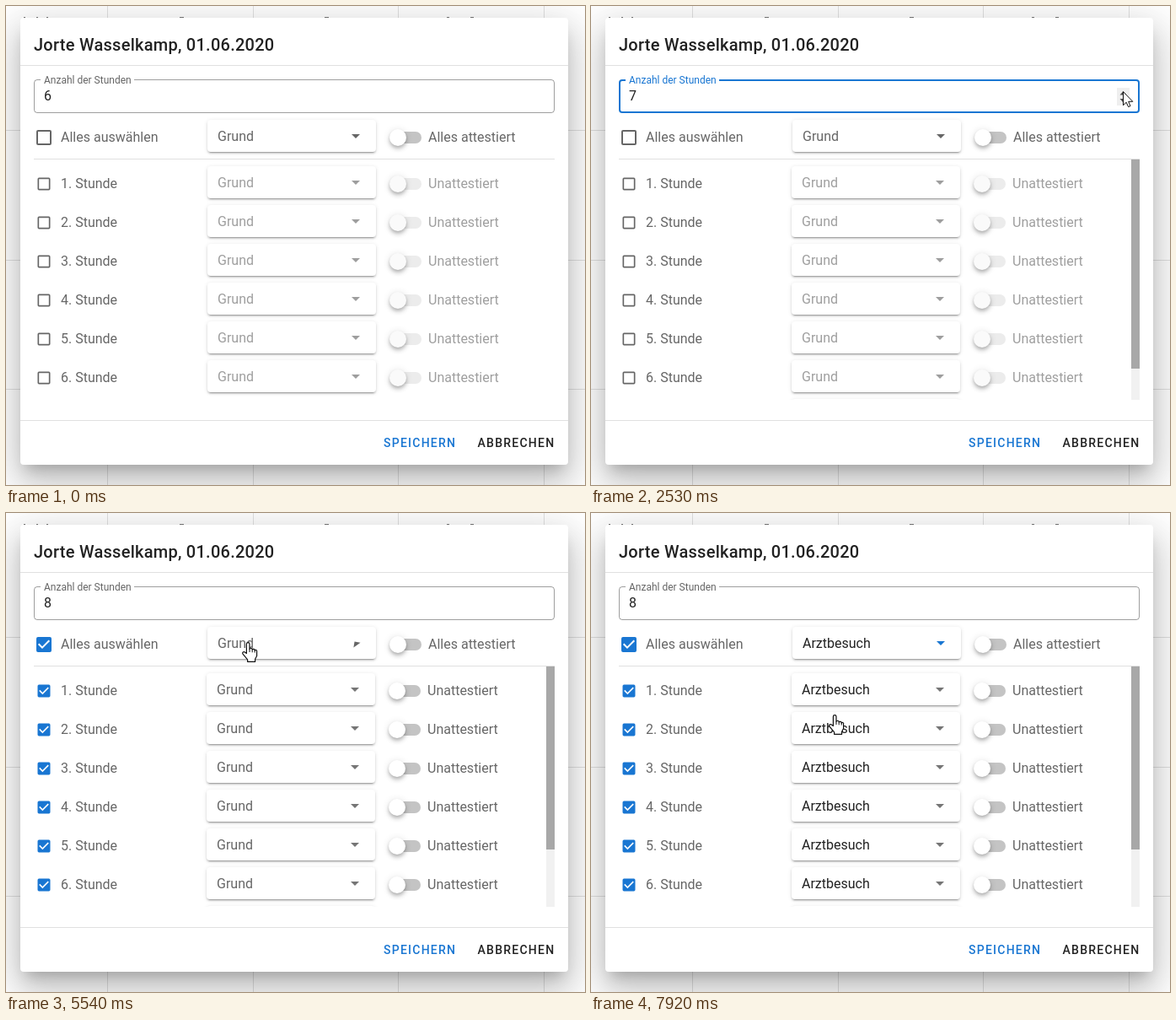
Recreate the animation shown at these times as an HTML page. Size 687 px wide and 568 px high, loop 8000 ms.

```html
<!DOCTYPE html>
<html lang="de">
<head>
<meta charset="utf-8">
<title>Abwesenheit</title>
<style>
html, body { margin: 0; width: 100%; height: 100%; overflow: hidden; background: #fff; }
#stage { position: relative; width: 687px; height: 568px; overflow: hidden; font-family: Roboto, sans-serif; }
#stage div, #stage svg { position: absolute; box-sizing: border-box; }
.text { white-space: pre; line-height: normal; }
.line { background: #e0e0e0; }
.dialog { background: #fff; border-radius: 4px;
  box-shadow: 0 11px 15px -7px rgba(0,0,0,.2), 0 24px 38px 3px rgba(0,0,0,.14), 0 9px 46px 8px rgba(0,0,0,.12); }
.select { background: #fff; border-radius: 4px;
  box-shadow: 0 3px 1px -2px rgba(0,0,0,.2), 0 2px 2px rgba(0,0,0,.14), 0 1px 5px rgba(0,0,0,.12); }
.menu { background: #fff; border-radius: 4px;
  box-shadow: 0 5px 5px -3px rgba(0,0,0,.2), 0 8px 10px 1px rgba(0,0,0,.14), 0 3px 14px 2px rgba(0,0,0,.12); }
.track { border-radius: 7px; }
.thumb { border-radius: 50%;
  box-shadow: 0 2px 4px -1px rgba(0,0,0,.2), 0 4px 5px rgba(0,0,0,.14), 0 1px 10px rgba(0,0,0,.12); }
.field { border-radius: 4px; }
.ripple { border-radius: 50%; background: #1976d2; }
svg { overflow: visible; }
</style>
</head>
<body>
<div id="stage"></div>
<script>
const LOOP = 8000;
const BLUE = "#1976d2";
const FOCUS = 1350, SEVEN = 2460, EIGHT = 2920, CHECK = 4340;
const OPEN = 5420, PICK = 7420, CLOSE = 7560;
const ink = a => `rgba(0,0,0,${a})`;
const clamp = v => Math.max(0, Math.min(1, v));
const part = (t, from, len) => clamp((t - from) / len);
const swift = p => 1 - Math.pow(1 - p, 3.15);
const smooth = p => p * p * (3 - 2 * p);
const mix = (a, b, p) => `rgb(${a.map((v, i) => Math.round(v + (b[i] - v) * p))})`;
const show = (el, on) => { el.style.display = on ? "" : "none"; };

const stage = document.getElementById("stage");

function box(parent, x, y, w, h, cls, fill) {
  const el = document.createElement("div");
  if (cls) el.className = cls;
  Object.assign(el.style, { left: x + "px", top: y + "px", width: w + "px", height: h + "px" });
  if (fill) el.style.background = fill;
  parent.append(el);
  return el;
}

// y is the baseline
function text(parent, str, x, y, size, color, weight = 400, spacing = 0) {
  const el = document.createElement("div");
  el.className = "text";
  el.textContent = str;
  Object.assign(el.style, {
    left: x + "px", top: y - Math.round(size * .9277) + "px", fontSize: size + "px",
    color, fontWeight: weight, letterSpacing: spacing + "px"
  });
  parent.append(el);
  return el;
}

function icon(parent, x, y, w, h, view, body) {
  const holder = document.createElement("div");
  holder.innerHTML = `<svg width="${w}" height="${h}" viewBox="0 0 ${view}">${body}</svg>`;
  const el = holder.firstChild;
  el.style.left = x + "px";
  el.style.top = y + "px";
  parent.append(el);
  return el;
}

function checkbox(parent, cx, cy, size) {
  const el = icon(parent, cx - size / 2, cy - size / 2, size, size, "24 24",
    `<rect x="4" y="4" width="16" height="16" rx="1" stroke-width="2"/>
     <path d="M5.7 11.3L10 15.6L18.3 7.3" fill="none" stroke="#fff" stroke-width="2"/>`);
  const [rect, tick] = el.children;
  return (on, color) => {
    rect.setAttribute("stroke", on ? color : ink(.6));
    rect.setAttribute("fill", on ? color : "none");
    show(tick, on);
  };
}

function select(parent, x, y) {
  const el = box(parent, x, y, 200, 38, "select");
  const label = text(el, "Grund", 12, 25, 16, ink(.6));
  const arrow = icon(el, 171, 17, 10, 5, "10 5", '<path d="M0 0H10L5 5Z"/>');
  return (value, color, arrowColor, turn = 0) => {
    label.textContent = value;
    label.style.color = color;
    arrow.style.fill = arrowColor;
    arrow.style.transform = `rotate(${turn}deg)`;
  };
}

function toggle(parent, x, cy, caption) {
  const track = box(parent, x + 2, cy - 7, 36, 14, "track");
  const knob = box(parent, x, cy - 10, 20, 20, "thumb");
  const label = text(parent, caption, x + 46, cy + 5, 16, ink(.6));
  return on => {
    track.style.background = on ? "#c4c4c4" : "#ececec";
    knob.style.background = on ? "#fff" : "#fafafa";
    label.style.color = ink(on ? .6 : .38);
  };
}

// Page behind the dialog
for (const x of [120, 293, 465, 638]) box(stage, x, 0, 1, 568, "line");
for (const y of [147, 301, 454]) box(stage, 0, y, 687, 1, "line");
for (const [x, w] of [[21, 2], [36, 2], [48, 2], [206, 5], [378, 5], [523, 3], [551, 4]])
  box(stage, x, 13, w, 1, "", "#777");

// Dialog frame
box(stage, 17, 14, 650, 530, "dialog");
text(stage, "Jorte Wasselkamp, 01.06.2020", 33, 53, 20, ink(.87), 500, .25);
box(stage, 17, 70, 650, 1, "line");
box(stage, 17, 491, 650, 1, "line");
text(stage, "SPEICHERN", 448, 523, 14, BLUE, 500, 1.25);
text(stage, "ABBRECHEN", 559.5, 523, 14, ink(.87), 500, 1.25);

// Number field
const field = box(stage, 33, 87, 618, 40, "field");
box(stage, 41, 86, 111, 4, "", "#fff");
const fieldLabel = text(stage, "Anzahl der Stunden", 45, 92, 12, ink(.6));
const count = text(stage, "6", 45, 112, 16, ink(.87));
const caret = box(stage, 54, 97, 1, 19, "", "#222");
const spinner = icon(stage, 624, 97, 15, 21, "15 21",
  `<path d="M0 0H15V21H0Z" fill="#efefef"/>
   <path d="M3.5 8.5L7.5 4L11.5 8.5ZM3.5 13L7.5 17.5L11.5 13Z" fill="#505050"/>`);

// Header row
const allCheck = checkbox(stage, 45, 156, 24);
text(stage, "Alles auswählen", 65, 161, 16, ink(.6));
const allSelect = select(stage, 239, 135);
toggle(stage, 455, 156, "Alles attestiert")(true);
const ripple = box(stage, 25, 136, 40, 40, "ripple");
box(stage, 33, 181, 618, 1, "line");

// Lesson list
const list = box(stage, 17, 182, 634, 285);
list.style.overflow = "hidden";
const rows = Array.from({ length: 8 }, (_, i) => {
  const el = box(list, 0, i * 46, 634, 46);
  const right = box(el, 0, 0, 634, 46);
  const check = checkbox(el, 28, 28.5, 20);
  text(el, `${i + 1}. Stunde`, 48, 34, 16, ink(.6));
  return { el, right, check, pick: select(right, 222, 8), flip: toggle(right, 438, 29, "Unattestiert") };
});
const bar = box(list, 624, 0, 10, 285, "", "#f1f1f1");
const barThumb = box(bar, 0, 0, 10, 217, "", "#a8a8a8");

// Menu
const menu = box(stage, 239, 135, 200, 296, "menu");
const items = ["Unbekannt", "Krankheit", "Arztbesuch", "Konferenz", "Privat", "familiäre Gründe", "sonstiges"]
  .map((name, i) => {
    const el = box(menu, 0, 8 + i * 40, 200, 40);
    text(el, name, 16, 24, 13, ink(.87), 500);
    return el;
  });

// Pointer shapes with their hot spots
const shapes = {
  arrow: [0, 0, '<path d="M.5 .7V16.7L4.2 13.2L6.6 18.6L9 17.6L6.7 12.3H11.8Z" fill="#fff" stroke="#111"/>'],
  hand: [7, 0, `<path d="M5.4 13.5V2.4a1.8 1.8 0 0 1 3.6 0V8.6a1.6 1.6 0 0 1 3.2 .6a1.6 1.6 0 0 1 3 .9
    a1.3 1.3 0 0 1 2.4 .9V16.5L15.6 20.3V23.3H6.6V20.8L1 14.2a1.6 1.6 0 0 1 2.4 -2.1Z"
    fill="#fff" stroke="#111" stroke-width="1.2" stroke-linejoin="round"/>
    <path d="M9 8.6V12M12.2 9.2V12.3M15.2 10.1V12.6" stroke="#111" fill="none"/>`],
  beam: [3.5, 8, '<path d="M0 .5H3M4 .5H7M3.5 1V16M0 16.5H3M4 16.5H7" stroke="#111" stroke-width="1.2" fill="none"/>']
};
const pointers = {};
for (const kind in shapes) pointers[kind] = icon(stage, 0, 0, 18, 24, "18 24", shapes[kind][2]);

// Moves as [time, x, y]; the pointer rests between them
const moves = [
  [[420, 400, 529], [640, 455, 420], [900, 540, 190], [1160, 562, 109]],
  [[1720, 562, 109], [1850, 602.5, 109], [2020, 625, 106], [2220, 631, 101]],
  [[3400, 631, 101], [3540, 524, 135], [3700, 300, 192], [3850, 85, 208], [3960, 6, 184], [4140, 40, 151]],
  [[4800, 40, 151], [5100, 170, 157], [5400, 287, 153]],
  [[6050, 287, 153], [6400, 288, 172], [6790, 289, 200]],
  [[6890, 289, 200], [7030, 289, 222], [7170, 289, 239]]
];

function spline(a, b, c, d, p) {
  return b + .5 * p * (c - a + p * (2 * a - 5 * b + 4 * c - d + p * (3 * (b - c) + d - a)));
}

function pointerAt(t) {
  const move = moves.filter(m => m[0][0] <= t).pop();
  if (!move) return null;
  const last = move.length - 1;
  if (t >= move[last][0]) return move[last].slice(1);
  const i = move.findIndex(k => k[0] > t) - 1;
  const at = j => move[Math.max(0, Math.min(last, j))];
  const p = (t - at(i)[0]) / (at(i + 1)[0] - at(i)[0]);
  return [1, 2].map(n => spline(at(i - 1)[n], at(i)[n], at(i + 1)[n], at(i + 2)[n], p));
}

function inField([x, y]) {
  return y > 87 && y < 127 && x > 33 && x < 651;
}

function pointerKind([x, y], t) {
  if (t > OPEN) return "hand";
  if (inField([x, y]) && x < 624) return "beam";
  const dy = Math.abs(y - 155);
  const overSelect = dy < 19 && x > 239 && x < 439;
  const overLabel = dy < 12 && (x > 25 && x < 181 || x > 453 && x < 605);
  return overSelect || overLabel ? "hand" : "arrow";
}

function drawField(t, pos, n) {
  const focused = t >= FOCUS && t < CHECK;
  const hover = pos && inField(pos);
  field.style.border = focused ? `2px solid ${BLUE}` : `1px solid ${ink(hover ? .86 : .38)}`;
  const tint = part(t, FOCUS, 180) - part(t, CHECK, 200);
  fieldLabel.style.color = mix([102, 102, 102], [25, 118, 210], tint);
  count.textContent = n;
  show(caret, t >= 1400 && t < 1900);
  show(spinner, focused || hover);
}

function drawRows(t, n) {
  const on = t >= CHECK, picked = t >= CLOSE;
  const scroll = n > 6;
  const checkColor = mix([117, 117, 117], [25, 118, 210], swift(part(t, 4400, 450)));
  const value = picked ? "Arztbesuch" : "Grund";
  const valueColor = ink(picked ? .87 : on ? .6 : .38);

  allCheck(on, checkColor);
  const turn = 180 * (swift(part(t, OPEN, 300)) - swift(part(t, CLOSE, 300)));
  allSelect(value, ink(picked ? .87 : .6), t > 5620 ? BLUE : ink(.6), turn);

  rows.forEach((row, i) => {
    show(row.el, i < n);
    row.right.style.left = scroll ? "-1px" : "0";
    row.check(on, checkColor);
    row.pick(value, valueColor, ink(on ? .54 : .38));
    row.flip(on);
  });
  show(bar, scroll);
  barThumb.style.height = Math.round(285 * 285 / (46 * n + 6)) + "px";

  const grow = swift(part(t, CHECK, 220));
  ripple.style.transform = `scale(${grow})`;
  ripple.style.opacity = .4 * (on ? 1 - part(t, 4780, 220) : 0);
}

function drawMenu(t, pos) {
  const alpha = smooth(part(t, 5620, 120)) - smooth(part(t, CLOSE, 220));
  show(menu, alpha > 0);
  menu.style.opacity = alpha;
  const hot = pos ? Math.floor((pos[1] - 143) / 40) : -1;
  const shade = .04 + .08 * part(t, PICK, 140);
  items.forEach((el, i) => { el.style.background = i === hot ? ink(shade) : "none"; });
}

function drawPointer(t, pos) {
  const kind = pos && pointerKind(pos, t);
  for (const k in pointers) show(pointers[k], k === kind);
  if (!kind) return;
  const [dx, dy] = shapes[kind];
  pointers[kind].style.transform = `translate(${Math.round(pos[0] - dx)}px,${Math.round(pos[1] - dy)}px)`;
}

function draw(now) {
  const t = now % LOOP;
  const pos = pointerAt(t);
  const n = t < SEVEN ? 6 : t < EIGHT ? 7 : 8;
  drawField(t, pos, n);
  drawRows(t, n);
  drawMenu(t, pos);
  drawPointer(t, pos);
}

const start = performance.now();
function tick() {
  draw(performance.now() - start);
  requestAnimationFrame(tick);
}
tick();
</script>
</body>
</html>
```
